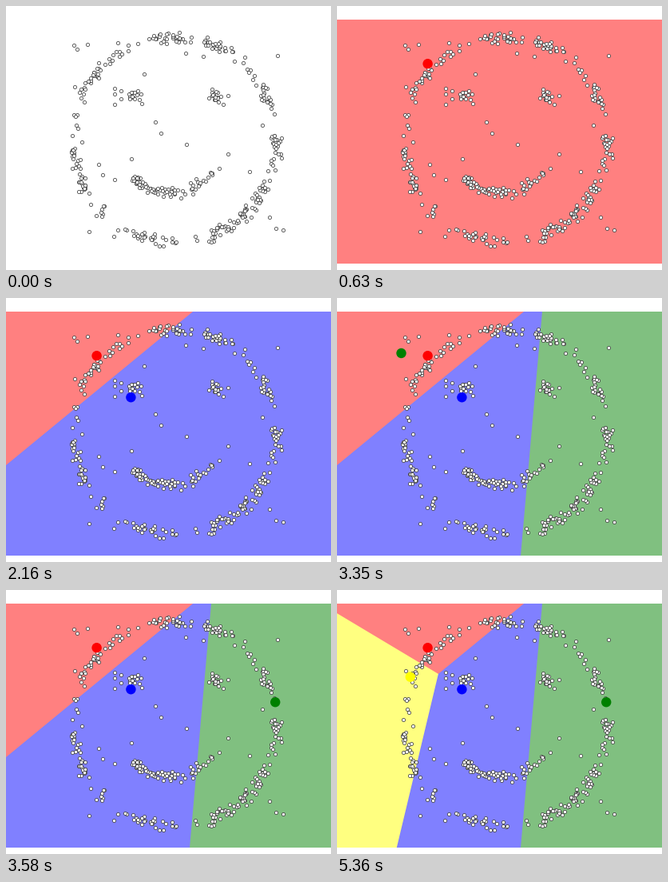
Recreate the animation shown at these times as a matplotlib script. Size 407 by 330 pixels, loop 8 s.

```python
import numpy as np
import matplotlib.pyplot as plt
from matplotlib.animation import FuncAnimation
from matplotlib.patches import Circle, Polygon

W, H, DPI = 407, 330, 100
LOOP, STEP = 8000, 20
TOP, BOTTOM = 17, 322
PX = 72 / DPI
FACE_X, FACE_Y, RADIUS = 210.5, 167, 128.5
DENSE = [2, 36, 48, 61, 104, 153, 172, 219, 266, 296, 336]  # degrees, clockwise
STRAY = [(89, 54), (173, 85), (187, 145), (194, 159), (226, 173),
         (278, 185), (305, 207), (340, 62), (121, 211), (347, 280)]
rng = np.random.default_rng(7)


def outline(loose, clump):
    """Ring of points: some anywhere, the rest gathered at the dense angles."""
    gathered = np.repeat(DENSE, clump) + rng.normal(0, 4.5, len(DENSE) * clump)
    ang = np.radians(np.concatenate([rng.uniform(0, 360, loose), gathered]))
    r = RADIUS + np.clip(rng.normal(0, 4, len(ang)), -8, 8)
    return np.column_stack([FACE_X + r * np.cos(ang), FACE_Y + r * np.sin(ang)])


def eye(x, y, n=18):
    return rng.normal((x, y), (7, 5), (n, 2))


def mouth(n=75):
    x = 158 + 112 * rng.uniform(0, 1, n) ** 1.4
    y = 233 - 0.0076 * (x - 205) ** 2 + np.clip(rng.normal(0, 3.5, n), -8, 8)
    return np.column_stack([x, y])


def scatter(n=20):
    return rng.uniform((84, 40), (340, 290), (n, 2))


def closer(poly, p, q):
    """Part of the polygon that is nearer to p than to q."""
    p, q = np.array(p), np.array(q)
    side = [np.dot(v - (p + q) / 2, p - q) for v in poly]
    out = []
    for i, v in enumerate(poly):
        j = (i + 1) % len(poly)
        if side[i] >= 0:
            out.append(v)
        if side[i] * side[j] < 0:
            out.append(v + (poly[j] - v) * side[i] / (side[i] - side[j]))
    return out


# dot colour, cell tint, home, time the cell opens, (time, x, y) stops of the dot
CENTERS = [
    ("#ff0000", "#ff8080", (113.6, 72.2), 500, [(630, 113.6, 72.2)]),
    ("#0000ff", "#8080ff", (156.4, 124.2), 1930,
     [(2040, 218, 152), (2160, 156.4, 124.2)]),
    ("#008000", "#80c080", (337.2, 140.2), 3350,
     [(3350, 80.5, 69), (3460, 250, 116), (3580, 337.2, 140.2)]),
    ("#ffff00", "#ffff80", (91.8, 108.7), 5140,
     [(5260, 244, 128), (5360, 91.8, 108.7)]),
]

fig = plt.figure(figsize=(W / DPI, H / DPI), dpi=DPI, facecolor="white")
ax = fig.add_axes([0, 0, 1, 1])
ax.set(xlim=(0, W), ylim=(H, 0))
ax.axis("off")

cells, dots = [], []
box = [np.array(v, float) for v in [(0, TOP), (W, TOP), (W, BOTTOM), (0, BOTTOM)]]
for k, (color, tint, home, _, _) in enumerate(CENTERS):
    poly = box
    for other in CENTERS[:k]:
        poly = closer(poly, home, other[2])
    cells.append(ax.add_patch(Polygon(poly, fc=tint, lw=0, zorder=1 + k / 10)))
    dots.append(ax.add_patch(Circle(home, 6.2, fc=color, lw=0, zorder=3)))

pts = np.vstack([outline(130, 16), eye(155, 111), eye(264, 112), mouth(),
                 scatter(), STRAY])
ax.plot(pts[:, 0], pts[:, 1], "o", ms=4.2 * PX, mfc="white", mec="#383838",
        mew=0.75 * PX, zorder=2)


def update(i):
    t = (i + 0.5) * STEP
    for cell, dot, (_, _, _, opens, stops) in zip(cells, dots, CENTERS):
        cell.set_visible(t >= opens)
        passed = [s for s in stops if t >= s[0]]
        dot.set_visible(bool(passed))
        if passed:
            dot.center = passed[-1][1:]
    return cells + dots


anim = FuncAnimation(fig, update, frames=LOOP // STEP, interval=STEP,
                     repeat=True, repeat_delay=0, blit=False)
plt.show()
```
